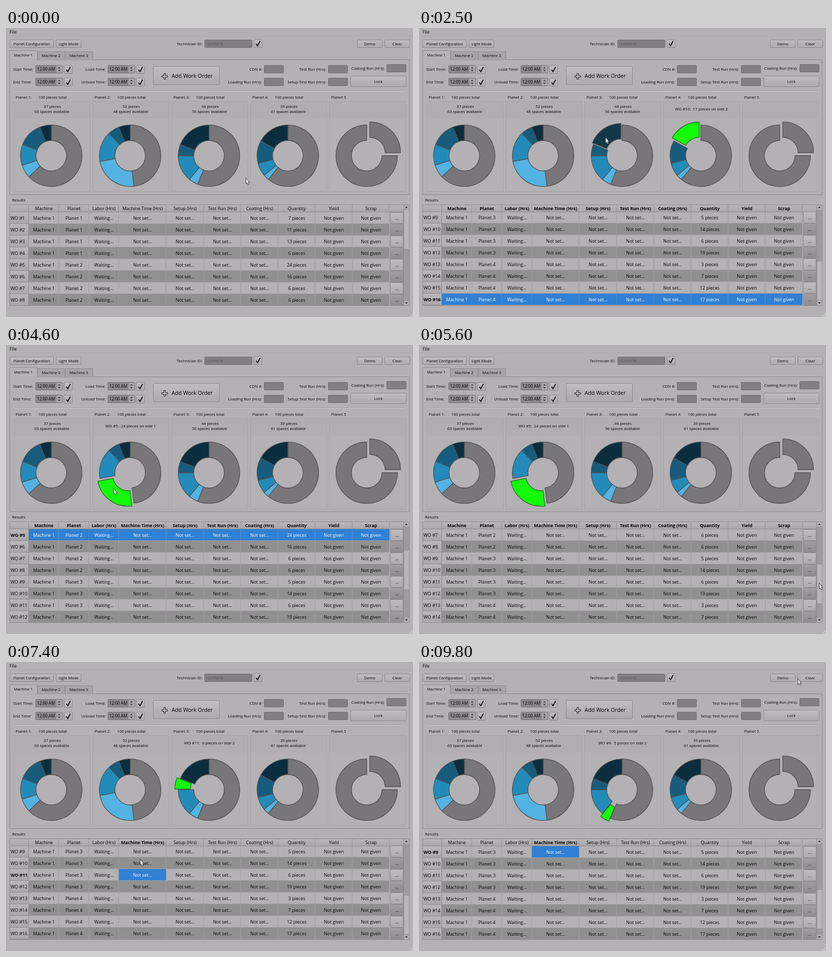
Write an HTML page that moves like this. It is 800x568 px and loops after 10000 ms.

```html
<!DOCTYPE html>
<html lang="en">
<head>
<meta charset="utf-8">
<title>Work order planner</title>
<style>
  html, body { margin: 0; width: 100%; height: 100%; overflow: hidden; background: #b3b1b3; }
  svg { display: block; width: 800px; height: 568px; font-family: "Open Sans", "Noto Sans", sans-serif; }
  text { white-space: pre; }
</style>
</head>
<body>
<svg id="stage" viewBox="0 0 800 568">
  <defs>
    <linearGradient id="button" x2="0" y2="1">
      <stop offset="0" stop-color="#bfbdbf"/><stop offset="1" stop-color="#acaaac"/>
    </linearGradient>
    <linearGradient id="head" x2="0" y2="1">
      <stop offset="0" stop-color="#b9b7b9"/><stop offset="1" stop-color="#a9a7a9"/>
    </linearGradient>
    <linearGradient id="dim" x2="0" y2="1">
      <stop offset="0" stop-color="#a09ea0"/><stop offset="1" stop-color="#8e8c8e"/>
    </linearGradient>
  </defs>
  <g id="fixed"></g>
  <g id="live"></g>
</svg>
<script>
const LOOP = 10000, STEP = 100;
const SMALL = 7.8, CELL = 8.9;
const BLUES = ['#53b3e2', '#238bba', '#175c7c', '#0b2e3e'];
const GREY = '#787678', GREEN = '#14fb0a', BORDER = '#8c8a8c', INK = '#040404';
const QUANTITY = [7, 11, 13, 6, 24, 16, 6, 6, 5, 14, 6, 19, 3, 7, 12, 17];
const COLUMNS = ['Machine', 'Planet', 'Labor (Hrs)', 'Machine Time (Hrs)', 'Setup (Hrs)',
  'Test Run (Hrs)', 'Coating (Hrs)', 'Quantity', 'Yield', 'Scrap'];
const EDGES = [45, 104, 163, 222, 315, 389, 462, 535, 608, 681, 754];
const ROW_TOP = 362, ROW_H = 23;
const RING = { y: 251, outer: 60.4, inner: 30 };

// time, work order, clicked column (-1 selects the whole row)
const SELECTIONS = [[1500, 16, -1], [3000, 12, -1], [4400, 5, -1], [6300, 13, 0], [7100, 11, 3], [7700, 9, 3]];
// time, offset of the scroll handle
const SCROLL = [[0, 0], [1499, 0], [1500, 101], [4399, 101], [4400, 46], [5400, 46], [5800, 101], [7699, 101], [7700, 90]];
// time, x, y
const POINTER = [
  [0, 471, 294], [400, 471, 294], [1100, 533, 205], [1800, 533, 205], [2150, 455, 277], [2500, 366, 214],
  [3200, 366, 214], [3600, 268, 262], [3900, 190, 290], [4200, 211, 281], [4700, 211, 281],
  [5300, 786, 440], [5400, 786, 440], [5800, 786, 494], [6200, 84, 463], [6600, 84, 463],
  [7000, 258, 417], [7200, 258, 417], [7500, 266, 372], [7800, 266, 372], [8400, 390, 103],
  [8700, 608, 55], [9000, 700, 40], [9300, 772, 22], [9600, 750, 30], [9800, 744, 32]
];

const rect = (x, y, w, h, fill, stroke = 'none', r = 0) =>
  `<rect x="${x}" y="${y}" width="${w}" height="${h}" rx="${r}" fill="${fill}" stroke="${stroke}"/>`;
const line = (x1, y1, x2, y2, color) => `<path d="M${x1} ${y1}L${x2} ${y2}" stroke="${color}"/>`;
const path = (d, fill, extra = '') => `<path d="${d}" fill="${fill}" ${extra}/>`;

function text(x, y, value, { size = SMALL, anchor = 'start', weight = 400, fill = INK } = {}) {
  return `<text x="${x}" y="${y + size * 0.36}" font-size="${size}" text-anchor="${anchor}" font-weight="${weight}" fill="${fill}">${value}</text>`;
}
const centered = (x, y, value, options) => text(x, y, value, { anchor: 'middle', ...options });
const rightAligned = (x, y, value) => text(x, y, value, { anchor: 'end' });

function button(x, y, w, h, label = '', size = SMALL) {
  return rect(x + .5, y + .5, w - 1, h - 1, 'url(#button)', BORDER, 1.5) + centered(x + w / 2, y + h / 2, label, { size });
}
function checkButton(x, y) {
  const mark = `M${x + 4.5} ${y + 9}l3 4l5 -9.5`;
  return button(x, y, 17, 17) + path(mark, 'none', 'stroke="#050505" stroke-width="1.7"');
}
const field = (x, y, w, fill = '#817f81') => rect(x + .5, y + .5, w - 1, 15, fill, '#737173', 1.5);

function timeInput(label, labelX, x, y) {
  const arrow = (cy, dir) => path(`M${x + 44} ${cy}h5l-2.5 ${dir * 3}z`, '#3a383a');
  return text(labelX, y + 8, label) + field(x, y, 54, '#8a888a') +
    rect(x + 41, y + 1, 12, 14, '#a6a4a6') + arrow(y + 6.5, -1) + arrow(y + 9.5, 1) +
    text(x + 3, y + 8, '12:00 AM', { size: 8.1 }) + checkButton(x + 56, y);
}

function slice(cx, from, to, fill, push = 0, stroke = '#515052') {
  const angle = share => share * Math.PI / 50;
  const mid = angle((from + to) / 2);
  const ox = cx + push * Math.sin(mid), oy = RING.y - push * Math.cos(mid);
  const at = (r, share) => `${(ox + r * Math.sin(angle(share))).toFixed(2)} ${(oy - r * Math.cos(angle(share))).toFixed(2)}`;
  const large = to - from > 50 ? 1 : 0;
  const { outer, inner } = RING;
  return path(`M${at(outer, from)}A${outer} ${outer} 0 ${large} 1 ${at(outer, to)}` +
    `L${at(inner, to)}A${inner} ${inner} 0 ${large} 0 ${at(inner, from)}Z`, fill, `stroke="${stroke}" stroke-width="1.3"`);
}

function drawFixed() {
  let out = text(7, 8, 'File', { size: 8.7 }) + line(0, 15.5, 800, 15.5, '#aaa8aa');
  out += button(7, 23, 87, 16, 'Planet Configuration', 7.5) + button(98, 23, 50, 16, 'Light Mode', 7.6);
  out += rightAligned(386, 31, 'Technician ID:') + field(390, 23, 94) +
    text(392, 31, '12345678', { size: 7.7, fill: '#545254' }) + checkButton(487, 22);
  out += button(690, 23, 50, 16, 'Demo') + button(744, 23, 50, 16, 'Clear');

  out += rect(7.5, 62.5, 785, 265, '#b3b1b3', BORDER);
  [0, 1, 2].forEach(i => {
    const x = 7 + i * 54.5, top = i ? 46.5 : 44.5;
    out += path(`M${x + .5} 62.5V${top}h54V62.5`, i ? '#a6a4a6' : '#b5b3b5', `stroke="${BORDER}"`);
    if (!i) out += line(8, 62.5, 61, 62.5, '#b3b1b3');
    out += centered(x + 27, i ? 54.5 : 53.5, `Machine ${i + 1}`, { size: 7.6 });
  });

  out += timeInput('Start Time:', 14, 58, 73) + timeInput('End Time:', 14, 58, 98);
  out += timeInput('Load Time:', 156, 200, 73) + timeInput('Unload Time:', 148, 200, 98);
  out += button(289, 75, 131, 37) + text(325.5, 94, 'Add Work Order', { size: 10.7 });
  out += path('M310.5 89.5h3v4h4v3h-4v4h-3v-4h-4v-3h4z', '#c8c6c8', 'stroke="#222" stroke-width="1.1"');

  out += rightAligned(504, 81, 'CDN #:') + field(507, 73, 39);
  out += rightAligned(503, 106, 'Loading Run (Hrs):') + field(507, 98, 39);
  out += rightAligned(629, 81, 'Test Run (Hrs):') + field(633, 73, 39);
  out += rightAligned(629, 106, 'Setup Test Run (Hrs):') + field(633, 98, 39);
  out += rightAligned(744, 79, 'Coating Run (Hrs):') + field(748, 71, 39) + button(677, 94, 110, 22, 'Lock');
  out += line(15, 124.5, 785, 124.5, '#cbc9cb') + line(15, 123.5, 785, 123.5, '#a3a1a3');

  for (let i = 0; i < 5; i++) {
    const x = 15 + i * 155;
    out += text(x + 4, 136, `Planet ${i + 1}` + (i < 4 ? ':' : ''));
    if (i < 4) out += text(x + 48.5, 136, '100 pieces total', { size: 7.7 });
    out += rect(x + .5, 144.5, 150, 177, '#b0aeb0', '#a6a4a6') + rect(x + 1, 178, 149, 143, '#b3b1b3');
  }
  out += slice(709, 0, 25, GREY, 8.5) + slice(709, 25, 100, GREY);
  out += text(12, 338, 'Results') + path('M800 559v9h-9z', '#c0bec0');
  document.getElementById('fixed').innerHTML = out;
}

function sample(keys, t) {
  const next = keys.findIndex(key => key[0] > t);
  if (next < 0) return keys[keys.length - 1].slice(1);
  const a = keys[next - 1], b = keys[next], p = (t - a[0]) / (b[0] - a[0]);
  return a.slice(1).map((v, i) => v + (b[i + 1] - v) * p);
}
const selectionAt = t => SELECTIONS.filter(s => s[0] <= t).pop();

function planetChart(index, chosen, [px, py]) {
  const cx = 89 + index * 155;
  const pieces = QUANTITY.slice(index * 4, index * 4 + 4);
  const total = pieces.reduce((a, b) => a + b);
  const radius = Math.hypot(px - cx, py - RING.y);
  const onRing = radius > RING.inner && radius < RING.outer;
  const share = (Math.atan2(px - cx, RING.y - py) * 50 / Math.PI + 100) % 100;
  let from = 100 - total, out = slice(cx, 0, from, GREY), raised = '', label = '';
  pieces.forEach((count, i) => {
    const to = from + count, order = index * 4 + i + 1;
    if (order === chosen) {
      raised += slice(cx, from, to, GREEN, 6.8, '#226a22');
      label = centered(cx + 1, 159, `WO #${order}:  ${count} pieces on side ${index < 2 ? 1 : 2}`);
    } else if (onRing && share > from && share < to) {
      raised += slice(cx, from, to, i === 3 ? '#12384a' : BLUES[i], 3.6);
    } else {
      out += slice(cx, from, to, BLUES[i]);
    }
    from = to;
  });
  label ||= centered(cx + 2, 154, `${total} pieces`) + centered(cx + 1, 164, `${100 - total} spaces available`, { size: 7.7 });
  return out + raised + label;
}

function cellText(order, column) {
  const planet = Math.ceil(order / 4);
  if (column === 7) return `${QUANTITY[order - 1]} pieces`;
  if (column > 7) return 'Not given';
  return ['Machine 1', `Planet ${planet}`, 'Waiting...'][column] || 'Not set...';
}

function table(offset, selection) {
  const [, chosen, chosenColumn] = selection || [0, 0, 0];
  const first = Math.min(8, Math.round(offset / 11.4));
  const top = ROW_TOP - (offset > 97 ? 1 : 0);
  let out = rect(7, 347, 775, 199, '#b3b1b3');
  for (let row = 0; row < 8; row++) {
    const order = first + row + 1, y = top + row * ROW_H, mid = y + 11.8;
    const odd = order % 2, active = order === chosen;
    out += rect(45, y, 709, ROW_H, odd ? '#b3b1b3' : '#919091');
    COLUMNS.forEach((_, c) => {
      const x = EDGES[c], w = EDGES[c + 1] - x;
      const picked = active && (chosenColumn < 0 || chosenColumn === c);
      if (picked) out += rect(x, y, w, ROW_H, '#3080d3');
      out += line(x + w - .5, y, x + w - .5, y + ROW_H, picked ? '#5590c8' : '#a09ea0');
      out += centered(x + w / 2, mid, cellText(order, c), { size: CELL, fill: picked ? '#fff' : INK });
    });
    out += line(45, y + 22.5, 754, y + 22.5, '#a09ea0');
    out += rect(7.5, y - .5, 37, ROW_H, 'url(#head)', BORDER);
    out += text(9, mid, `WO #${order}`, { size: 8.8, weight: active ? 700 : 400 });
    out += rect(755.5, y + .5, 25, 22, odd ? 'url(#button)' : 'url(#dim)', BORDER, 1.5) + centered(768, mid - .5, '...', { size: CELL });
  }
  out += rect(7.5, 347.5, 774, 14, 'url(#head)', BORDER) + line(44.5, 348, 44.5, 361, BORDER);
  COLUMNS.forEach((name, c) => {
    const bold = chosen && (chosenColumn < 0 || chosenColumn === c);
    out += line(EDGES[c + 1] - .5, 348, EDGES[c + 1] - .5, 361, '#979597');
    out += centered((EDGES[c] + EDGES[c + 1]) / 2, 355, name, { size: 8.8, weight: bold ? 700 : 400 });
  });
  out += rect(781.5, 347.5, 11, 198, '#9d9b9d', BORDER);
  out += rect(782, 348, 10, 9, '#b3b1b3') + rect(782, 536, 10, 9, '#b3b1b3');
  out += path('M784.5 354h5l-2.5 -3.5z', '#2c2a2c') + path('M784.5 539h5l-2.5 3.5z', '#2c2a2c');
  out += rect(782, 357 + offset, 10.5, 78, '#b8b6b8', BORDER, 1);
  return out + rect(7.5, 347.5, 785, 198, 'none', BORDER);
}

function pointer([x, y]) {
  const overAdd = x > 285 && x < 420 && y > 75 && y < 112;
  const shape = overAdd
    ? 'M1.5 1.2q1.5 -1 2 .6v4l4.5 1q1.2 .4 1 2l-.6 4.6h-4.6l-4.4 -5q.2 -1.4 1.4 -.8l.7 .7z'
    : 'M.5 .5v11.6l2.4 -1.8l1.6 3.6l2.2 -1l-1.6 -3.6h2.8z';
  return `<g transform="translate(${x} ${y})">${path(shape, '#e2e0e2', 'stroke="#333" stroke-width=".9" stroke-linejoin="round"')}</g>`;
}

function render(t) {
  const cursor = sample(POINTER, t), selection = selectionAt(t);
  // charts follow a cell click one step later than the table
  const late = selection && selection[2] >= 0 ? selectionAt(t - STEP) : selection;
  const charts = [0, 1, 2, 3].map(i => planetChart(i, late && late[1], cursor)).join('');
  document.getElementById('live').innerHTML = charts + table(sample(SCROLL, t)[0], selection) + pointer(cursor);
}

drawFixed();
const start = performance.now();
let shown = -1;
function tick() {
  const t = Math.floor((performance.now() - start) % LOOP / STEP) * STEP;
  if (t !== shown) render(shown = t);
  requestAnimationFrame(tick);
}
tick();
</script>
</body>
</html>
```
